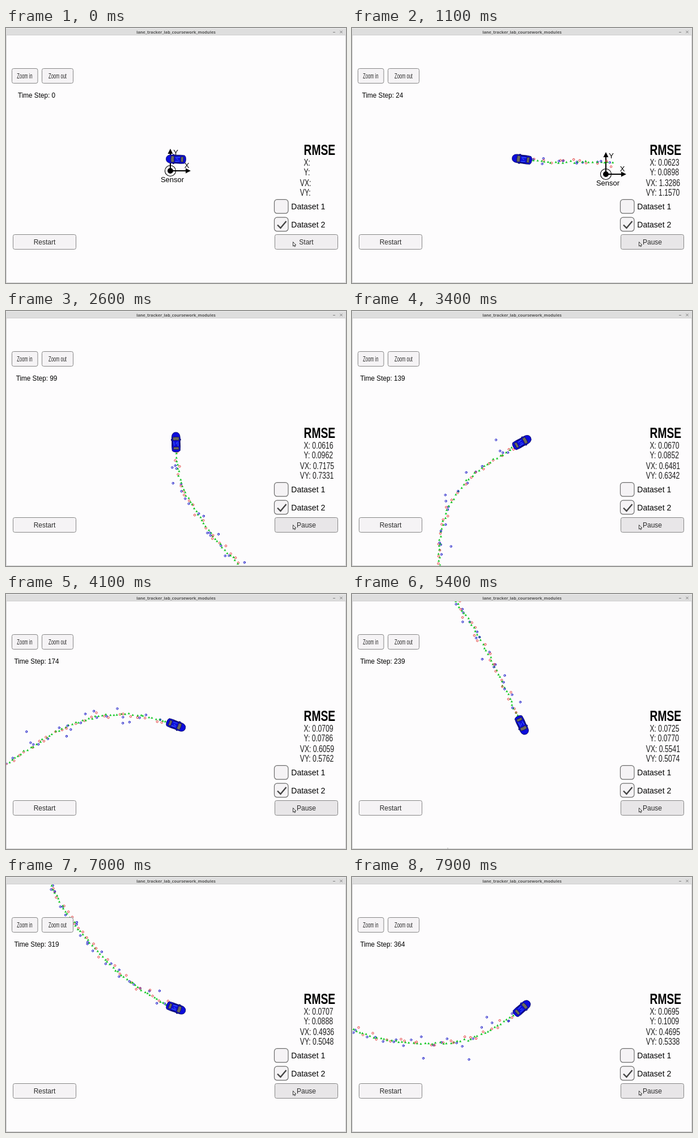
These frames come from a looping animation (600 px wide and 450 px high, 8000 ms). An HTML page:

```html
<!DOCTYPE html>
<html lang="en">
<head>
<meta charset="utf-8">
<title>Tracking demo</title>
<style>
html, body { margin: 0; width: 100%; height: 100%; overflow: hidden; background: #fdfcfd; }
svg { display: block; width: 600px; height: 450px; }
text { font-family: "Liberation Sans", Arial, sans-serif; font-size: 12px; fill: #000; }
.mid { text-anchor: middle; }
.btn { fill: #f5f3f5; stroke: #868686; }
.box { fill: #f5f3f5; stroke: #6c6c6c; stroke-width: 1.2; }
.cap { fill: #2b2b2b; }
.stat { font-size: 16.8px; fill: #1c1c1c; }
.axis { font-size: 13px; }
.set { font-size: 14px; }
.title { font: bold 7.3px "Noto Sans", "Open Sans", sans-serif; fill: #555; }
.laser { fill: none; stroke: #e02020; stroke-width: .9; }
.radar { fill: none; stroke: #1818c8; stroke-width: 1; }
.guess { fill: #18c828; }
</style>
</head>
<body>
<svg viewBox="0 0 600 450">
  <rect width="600" height="450" fill="#fdfcfd"/>
  <g id="world">
    <g transform="translate(-10 20.5)">
      <path d="M0 0V-32M0 0H29" stroke="#000" stroke-width="2"/>
      <path d="M0 -39l4.5 9h-9zM36 0l-9 4.5v-9z"/>
      <circle r="9.5" fill="none" stroke="#000" stroke-width="1.1"/>
      <circle r="5"/>
      <g class="mid">
        <text class="axis" x="9.5" y="-28">Y</text>
        <text class="axis" x="29" y="-5.5">X</text>
        <text class="axis" x="3.5" y="19.5">Sensor</text>
      </g>
    </g>
    <g id="trail"></g>
  </g>
  <g id="car">
    <path d="M3 -8.8l2.5 0 .5 2h-3zM3 8.8l2.5 0 .5 -2h-3z" fill="#0a0a70"/>
    <path d="M-15 -7Q-17.5 -5 -17.5 0T-15 7Q-8 7.9 0 7.3Q9 7.9 12.5 6.8Q17.5 5 17.5 0T12.5 -6.8Q9 -7.9 0 -7.3Q-8 -7.9 -15 -7Z"
      fill="#0c0cdc" stroke="#06065e" stroke-width=".8"/>
    <path d="M3 -5L8.5 -6Q10 0 8.5 6L3 5Q4 0 3 -5Z" fill="#6a6a60" stroke="#111150" stroke-width=".8"/>
    <path d="M-8.5 -4.5L-13 -5V5L-8.5 4.5Z" fill="#6a6a60" stroke="#111150" stroke-width=".8"/>
    <path d="M-8 -6.2H3M-8 6.2H3" stroke="#111150"/>
    <path d="M-6 -3L1 -4M-7 3.5L1 3M-4 0L0 1" stroke="#4a7cff" stroke-width=".9"/>
  </g>

  <rect width="600" height="13" fill="#dedede"/>
  <path d="M0 .5H600" stroke="#efefef"/>
  <path d="M0 12.5H600" stroke="#cfcfcf"/>
  <path d="M.5 13V449.5H599.5V13" fill="none" stroke="#cfcfcf"/>
  <text class="title mid" x="300" y="9.6">lane_tracker_lab_coursework_modules</text>
  <path d="M577 7.5h4M589.3 4.8l4.4 4.4m0 -4.4l-4.4 4.4" stroke="#777" stroke-width=".9" fill="none"/>

  <rect class="btn" x="10.5" y="71.5" width="45.5" height="26" rx="3"/>
  <rect class="btn" x="63.5" y="71.5" width="55" height="26" rx="3"/>
  <rect class="btn" x="12.5" y="364.5" width="111" height="26" rx="3"/>
  <rect class="btn" id="run" x="474.5" y="364.5" width="111" height="26" rx="3"/>
  <g class="mid">
    <text class="cap" transform="translate(33 88.5) scale(.63 1)">Zoom in</text>
    <text class="cap" transform="translate(91 88.5) scale(.63 1)">Zoom out</text>
    <text class="cap" x="68" y="382">Restart</text>
    <text class="cap" id="runText" x="530" y="382">Start</text>
    <text id="clock" transform="translate(54 123.3) scale(.94 1)" style="font-size:12.5px"></text>
  </g>

  <text transform="translate(525.5 224.3) scale(.74 1)" style="font-size:26px;font-weight:bold">RMSE</text>
  <text class="stat" transform="translate(525.5 242.5) scale(.725 1)"></text>
  <text class="stat" transform="translate(525.5 260) scale(.725 1)"></text>
  <text class="stat" transform="translate(518.8 278.5) scale(.725 1)"></text>
  <text class="stat" transform="translate(518.8 295.7) scale(.725 1)"></text>

  <rect class="box" x="473.5" y="302.7" width="24.5" height="24.5" rx="5"/>
  <rect class="box" x="473.5" y="334.2" width="24.5" height="24.5" rx="5"/>
  <path d="M479 347.5L484.5 353L494.5 341" fill="none" stroke="#444" stroke-width="2.4"/>
  <text class="set" x="503.3" y="320">Dataset 1</text>
  <text class="set" x="503.3" y="351.5">Dataset 2</text>
  <path d="M506.5 377.5v7.5l1.7 -1.5 1.2 2.5 1.2 -.6 -1.1 -2.4h2.3z" fill="#fff" stroke="#222" stroke-width=".9"/>
</svg>
<script>
const LOOP = 8000, FRAME = 100, STEPS_PER_FRAME = 5, IDLE_STEPS = 31;
const LAST = LOOP / FRAME * STEPS_PER_FRAME - IDLE_STEPS, LAG = 3;
const CAR = { x: 300, y: 231.5 };

// Key points of the figure-eight drive: step, x, y
const ROUTE = [
  [0, 0, 0], [24, -158, -6], [42, -272, -37], [60, -376, -99], [85, -474, -228],
  [99, -490, -317], [112, -478, -400], [124, -426, -472], [152, -268, -557],
  [174, -126, -542], [201, 4, -453], [239, 121, -235], [279, 217, 1],
  [315, 386, 158], [344, 569, 180], [364, 683, 121], [385, 770, 10]
];

// Key errors: step, then X, Y, VX, VY
const ERRORS = [
  [24, .0623, .0898, 1.3286, 1.157], [99, .0616, .0962, .7175, .7331],
  [174, .0709, .0786, .6059, .5762], [239, .0725, .077, .5541, .5074],
  [279, .072, .078, .5194, .477], [364, .0695, .1009, .4695, .5338]
];
const LABELS = ["X:", "Y:", "VX:", "VY:"];

const byId = id => document.getElementById(id);
const stats = [...document.querySelectorAll(".stat")];

function segment(table, s) {
  let i = 0;
  while (i < table.length - 2 && s >= table[i + 1][0]) i++;
  return i;
}

function slope(i, k) {
  const a = ROUTE[Math.max(0, i - 1)], b = ROUTE[Math.min(ROUTE.length - 1, i + 1)];
  return (b[k] - a[k]) / (b[0] - a[0]);
}

// Smooth cubic through the key points
function place(s) {
  const i = segment(ROUTE, s), a = ROUTE[i], b = ROUTE[i + 1];
  const h = b[0] - a[0], u = (s - a[0]) / h, v = 1 - u;
  const axis = k => v * v * (1 + 2 * u) * a[k] + u * u * (3 - 2 * u) * b[k]
    + h * u * v * (v * slope(i, k) - u * slope(i + 1, k));
  return { x: axis(1), y: axis(2) };
}

function heading(s) {
  const a = place(Math.max(0, s - 1)), b = place(s + 1);
  return Math.atan2(b.y - a.y, b.x - a.x) * 180 / Math.PI;
}

// Errors fall roughly as a power of the step count
function errorAt(s, k) {
  const i = segment(ERRORS, s), a = ERRORS[i], b = ERRORS[i + 1];
  return a[k] * (b[k] / a[k]) ** (Math.log(s / a[0]) / Math.log(b[0] / a[0]));
}

let seed = 41;
function random() {
  seed = (seed * 16807) % 2147483647;
  return seed / 2147483647;
}
const noise = spread => spread * 2 * (random() + random() + random() - 1.5);

function svg(tag, attrs, parent) {
  const el = document.createElementNS("http://www.w3.org/2000/svg", tag);
  for (const name in attrs) el.setAttribute(name, attrs[name]);
  parent.append(el);
  return el;
}

const RING = "M-1.7 0a1.7 1.7 0 1 0 3.4 0a1.7 1.7 0 1 0 -3.4 0";
const SHAPES = { laser: RING, radar: RING + "M0 0L1.6 -.6", guess: "M0 -2L2.1 1.7H-2.1Z" };

function mark(kind, x, y, parent) {
  svg("path", { class: kind, d: SHAPES[kind], transform: `translate(${x} ${y})` }, parent);
}

// Laser and radar take turns; radar is noisier and now and then far off
function addStep(s) {
  const p = place(s), group = svg("g", {}, byId("trail"));
  if (s % 2) {
    const range = Math.hypot(p.x, p.y), wild = random() < .2 ? 2 : 1;
    const along = noise(5) * wild / range, across = noise(.016) * wild;
    mark("radar", p.x + along * p.x - across * p.y, p.y + along * p.y + across * p.x, group);
  } else {
    mark("laser", p.x + noise(3.2), p.y + noise(3.2), group);
  }
  mark("guess", p.x + noise(1), p.y + noise(1), group);
  return group;
}
const trail = Array.from({ length: LAST + 1 }, (_, s) => addStep(s));

function draw(tick) {
  const s = Math.max(0, tick * STEPS_PER_FRAME - IDLE_STEPS), p = place(s);
  const running = tick >= 5;
  byId("world").setAttribute("transform", `translate(${CAR.x - p.x} ${CAR.y - p.y})`);
  byId("car").setAttribute("transform", `translate(${CAR.x} ${CAR.y}) rotate(${heading(s)})`);
  trail.forEach((el, i) => el.setAttribute("visibility", i <= s - LAG ? "visible" : "hidden"));
  byId("clock").textContent = "Time Step: " + s;
  byId("runText").textContent = running ? "Pause" : "Start";
  byId("run").style.fill = running ? "#e8e6e8" : "#f0eef0";
  stats.forEach((el, i) => {
    el.textContent = LABELS[i] + (s ? " " + errorAt(s, i + 1).toFixed(4) : "");
  });
}

const start = performance.now();
let shown = -1;
function loop() {
  const tick = Math.floor(Math.max(0, performance.now() - start) % LOOP / FRAME);
  if (tick !== shown) draw(tick);
  shown = tick;
  requestAnimationFrame(loop);
}
loop();
</script>
</body>
</html>
```
